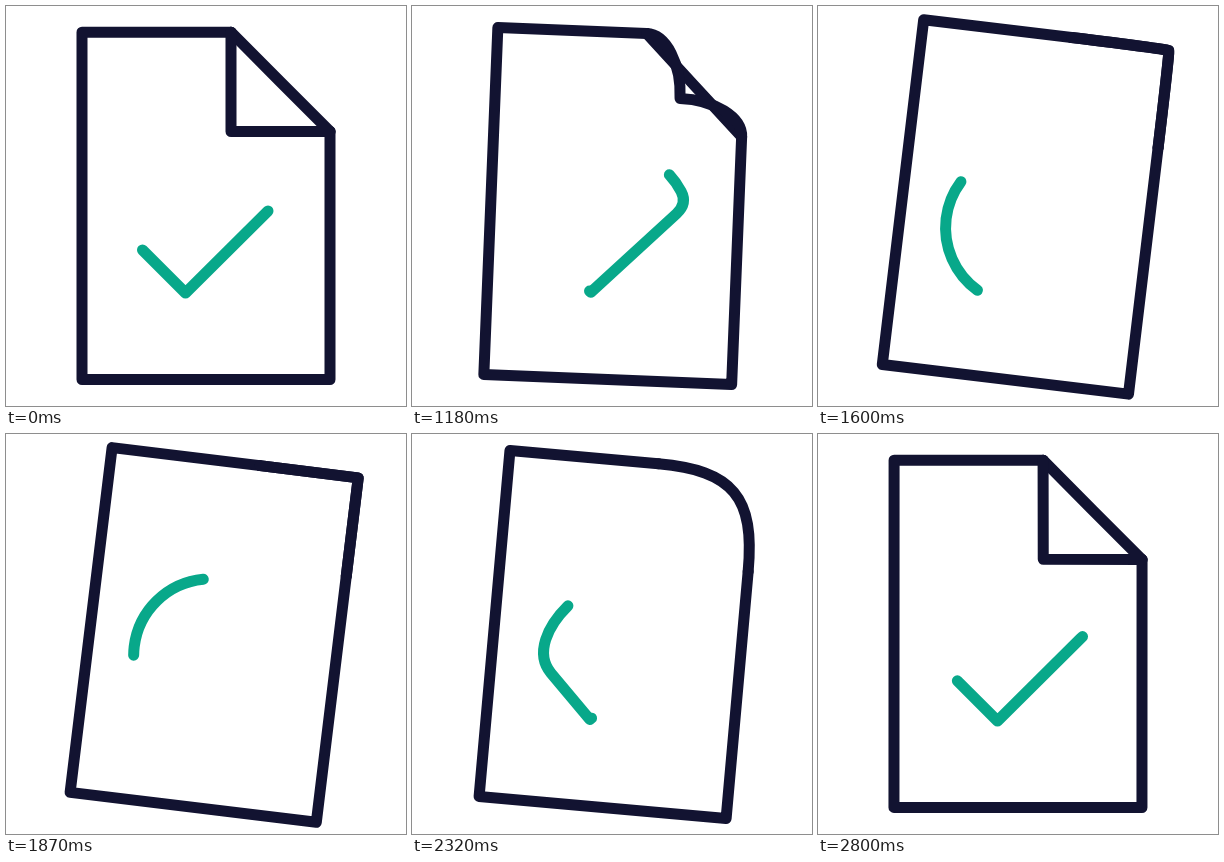
An HTML page for the animation above (2.83 s loop, 400x400 px).

```html
<!DOCTYPE html>
<html lang="en">
<head>
<meta charset="utf-8">
<title>Document check</title>
<style>
  html, body { margin: 0; width: 100%; height: 100%; overflow: hidden; background: #fff; }
  svg { display: block; width: 100vw; height: 100vh; }
  path { fill: none; stroke: #121331; stroke-width: 11; stroke-linecap: round; stroke-linejoin: round; }
  #check { stroke: #08a88a; }
</style>
</head>
<body>
<svg viewBox="0 0 400 400">
  <g id="doc">
    <path d="M225 26.2H76V373.5H324V125.5"/>
    <path id="edge"/>
    <path id="flap"/>
    <path id="check"/>
  </g>
</svg>
<script>
const [doc, edge, flap, check] = ['doc', 'edge', 'flap', 'check'].map(id => document.getElementById(id));
const LOOP = 2830, HOLD = 1030, STEP = 30;

// Check mark, then a curve onto a circle, two turns, and back into the check mark.
const mark = 'L179.5 287L262 205';
const turn = 'A77 77 0 0 0 199 298A77 77 0 0 0 199 144';
check.setAttribute('d', 'M136.5 244' + mark +
  'Q272.6 194.4 265.7 182.5A77 77 0 0 0 199 144' + turn + turn +
  'C165 144 104 211 136.5 244' + mark + 'l3 -3');
const markLength = Math.hypot(43, 43) + Math.hypot(82.5, 82);
const again = check.getTotalLength() - Math.hypot(3, 3) - markLength;

// Smooth monotone curve through [time, value] pairs.
function curve(keys) {
  const slope = keys.slice(1).map((k, i) => (k[1] - keys[i][1]) / (k[0] - keys[i][0]));
  const tangent = keys.map((_, i) => {
    const a = slope[i - 1] || 0, b = slope[i] || 0;
    return a * b > 0 ? 2 * a * b / (a + b) : 0;
  });
  return t => {
    let i = 0;
    while (i < keys.length - 2 && t > keys[i + 1][0]) i++;
    const [t0, v0] = keys[i], [t1, v1] = keys[i + 1], d = t1 - t0;
    const u = (t - t0) / d, w = 1 - u;
    return v0 * w * w * (1 + 2 * u) + v1 * u * u * (3 - 2 * u) +
      d * u * w * (tangent[i] * w - tangent[i + 1] * u);
  };
}

const tilt = curve([[0, 0], [30, .04], [330, 5.1], [600, 6.85], [780, 7],
  [1080, 6.5], [1320, 5.1], [1650, 1], [1800, .02], [1830, 0]]);
const unfold = curve([[0, 0], [30, .02], [330, .73], [600, .99], [760, 1],
  [1040, 1], [1080, .99], [1320, .785], [1600, .2], [1800, .002], [1830, 0]]);
const tail = curve([[0, 0], [30, 2], [330, 153], [600, 363],
  [1080, again - 285], [1320, again - 78], [1800, again + 2], [1830, again + 2.1]]);
const head = curve([[0, markLength], [30, markLength + 1.5], [330, 297], [600, 485],
  [1080, again - 165], [1320, again + 61], [1800, again + markLength + 1.5],
  [1830, again + markLength + 1.6]]);

// Two mirrored curves from the top edge through a point on the fold's axis to the right edge.
function corner(offset, out, inX, inY) {
  const x = 225 + offset, y = 125.5 - offset;
  return `M225 26.2C${225 + out} 26.2 ${x - inX} ${y - inY} ${x} ${y}` +
    `C${x + inY} ${y + inX} 324 ${125.5 - out} 324 125.5`;
}

function draw(t) {
  const p = unfold(t), opening = t < 900;
  const m = Math.max(0, 2 * p - 1), rest = 36 * (1 - m);
  doc.setAttribute('transform', `rotate(${tilt(t)} 195 268)`);
  edge.setAttribute('d', corner(49.5 + 49.5 * m, 66 * m, rest, rest));
  const bend = opening ? 54 : 0;
  flap.setAttribute('d', corner(99 * p, bend * p, 0, bend * (1 - p)));
  flap.style.display = opening || p < .5 ? '' : 'none';
  const start = tail(t);
  check.style.strokeDasharray = `${head(t) - start} 9999`;
  check.style.strokeDashoffset = -start;
}

const origin = performance.now();
function tick() {
  const t = (performance.now() - origin) % LOOP;
  draw(t < HOLD ? 0 : STEP * (Math.floor((t - HOLD) / STEP) + 1));
  requestAnimationFrame(tick);
}
tick();
</script>
</body>
</html>
```
